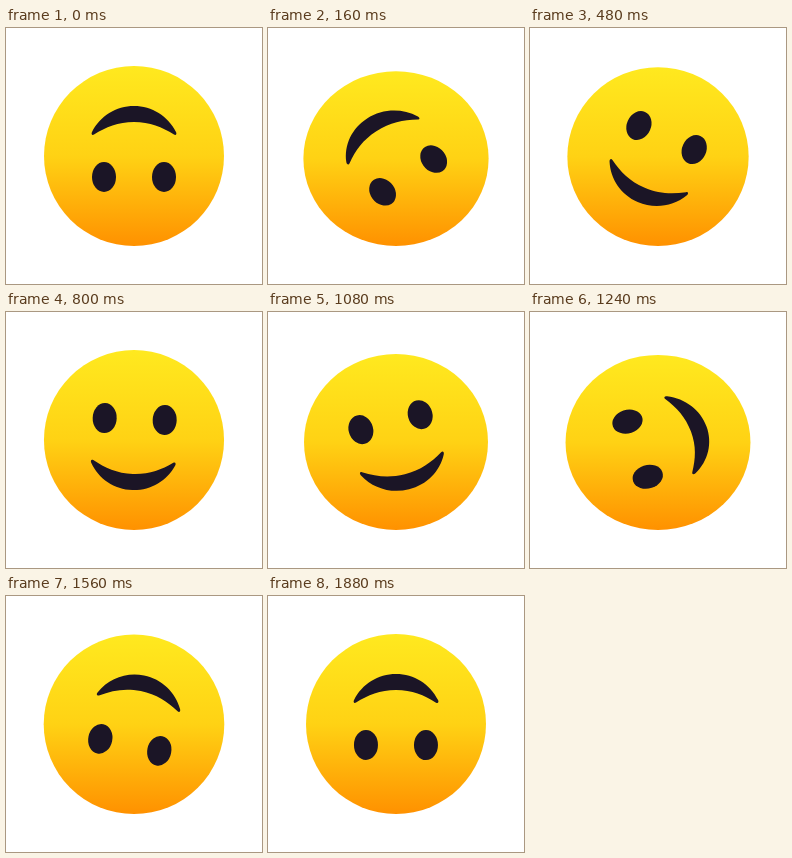
Write an HTML page that moves like this. It is 256x256 px and loops after 1.92 s.

```html
<!DOCTYPE html>
<html lang="en">
<head>
<meta charset="utf-8">
<title>Tumbling smile</title>
<style>
html, body { margin: 0; width: 100%; height: 100%; overflow: hidden; background: #fff; }
svg { display: block; width: 100%; height: 100%; }
</style>
</head>
<body>
<svg viewBox="0 0 256 256">
  <linearGradient id="skin" x2="0" y2="1">
    <stop stop-color="#ffe91f"/>
    <stop offset=".5" stop-color="#ffd214"/>
    <stop offset="1" stop-color="#ff9100"/>
  </linearGradient>
  <g id="head">
    <circle cy="-90" r="90" fill="url(#skin)"/>
    <g id="face" fill="#1b1526">
      <ellipse cx="-30" cy="-21" rx="12" ry="15"/>
      <ellipse cx="30" cy="-21" rx="12" ry="15"/>
      <path d="M-40 21.4C-28 29-16 34 0 34S28 29 40 21.4C42 20.2 43 22 42 24C34 40 18 50 0 50S-34 40-42 24C-43 22-42 20.2-40 21.4Z"/>
    </g>
  </g>
</svg>
<script>
const head = document.getElementById('head');
const face = document.getElementById('face');
const LOOP = 1920, HALF = LOOP / 2, STEP = 40;
const PEAK = 180, SQUASH = 0.03;

const smooth = s => s * s * (3 - 2 * s);

// cubic-bezier(1/3, 0, 0, 1), solved by bisection
function ease(x) {
  let lo = 0, hi = 1;
  for (let i = 0; i < 24; i++) {
    const s = (lo + hi) / 2;
    if (s * (1 - s) ** 2 + s ** 3 < x) lo = s; else hi = s;
  }
  return smooth(lo);
}

function draw(time) {
  const t = Math.floor((time + 4) / STEP) * STEP % LOOP;
  const u = t % HALF;
  const angle = (t < HALF ? 180 : 0) - 180 * ease(u / HALF);
  const k = SQUASH * (u < PEAK ? smooth(u / PEAK) : 1 - ease((u - PEAK) / (HALF - PEAK)));
  // the squash keeps the lowest point of the head in place
  head.setAttribute('transform', `translate(128 218) scale(${1 + k} ${1 - k})`);
  face.setAttribute('transform', `translate(0 -90) rotate(${angle})`);
}

function tick() {
  draw(performance.now());
  requestAnimationFrame(tick);
}
tick();
</script>
</body>
</html>
```
